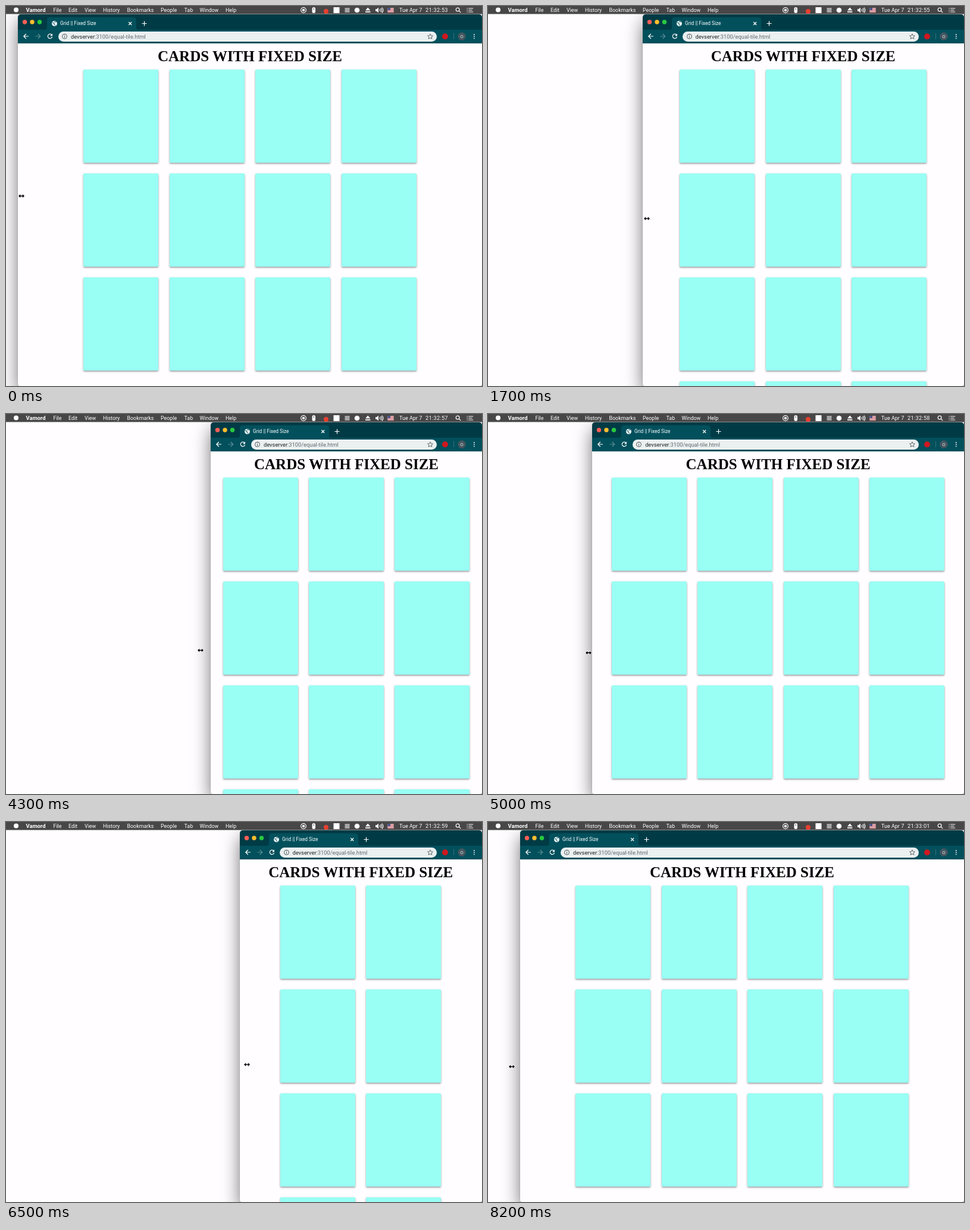
Animation of 800x640 px, one loop 8300 ms. Source, as an HTML page:

```html
<!DOCTYPE html>
<html lang="en">
<head>
<meta charset="utf-8">
<title>Fixed size cards</title>
<style>
  html, body { margin: 0; width: 100%; height: 100%; overflow: hidden; background: #fffdff; }
  body { font-family: Roboto, sans-serif; }
  #stage { position: absolute; left: 0; top: 0; width: 800px; height: 640px; overflow: hidden; }
  svg { position: absolute; top: 0; overflow: visible; }
  .line { fill: none; stroke: #fff; stroke-width: 1.2; }

  #window {
    position: absolute; top: 14px; right: 0; bottom: 0;
    border-radius: 5px 5px 3px 3px; background: #fffdff;
    box-shadow: 0 12px 30px rgba(0, 0, 0, .55), 0 0 1px rgba(0, 0, 0, .5);
  }
  #clip { position: absolute; inset: 0; overflow: hidden; border-radius: inherit; }
  #tabs { height: 26px; background: #003b45; }
  #tools { height: 23px; background: #02505c; }
  #address {
    position: absolute; left: 67.5px; right: 76px; top: 28.5px; height: 17.5px;
    border-radius: 9px; background: #ebf0f1;
  }
  #address span {
    position: absolute; left: 21.5px; right: 25px; overflow: hidden;
    white-space: nowrap; text-overflow: ellipsis;
    font-size: 9.3px; line-height: 17.5px; color: #62686c;
  }
  #address b { font-weight: 400; color: #202124; }
  h1 {
    margin: 9.4px 18px 9.6px; text-align: center; color: #000;
    font: bold 25px/25px "Liberation Serif", "Times New Roman", serif;
  }
  #cards {
    display: grid; grid-template-columns: repeat(auto-fill, 126px);
    grid-auto-rows: 156.7px; gap: 18.4px; justify-content: center;
    max-width: 560px; margin: 0 auto; padding: 0 18px;
  }
  #cards div {
    border-radius: 1.5px; background: #99fff4;
    box-shadow: 0 1.5px 3px rgba(0, 0, 0, .42);
  }
</style>
</head>
<body>
<div id="stage">
  <div id="window">
    <div id="clip">
      <div id="tabs"></div>
      <div id="tools"></div>
      <div id="address"><span><b>devserver</b>:3100/equal-tile.html</span></div>
      <h1>CARDS WITH FIXED SIZE</h1>
      <div id="cards"></div>

      <svg width="220" height="49" style="left:0">
        <circle cx="11.5" cy="13" r="3.7" fill="#ff5f57"/>
        <circle cx="24" cy="13" r="3.7" fill="#ffbd2e"/>
        <circle cx="36.5" cy="13" r="3.7" fill="#28c940"/>
        <path d="M45 26q4 0 4-4V10q0-5 5-5H194q5 0 5 5V22q0 4 4 4z" fill="#02505c"/>
        <circle cx="61.5" cy="15.5" r="4.5" fill="#e8f1f2"/>
        <path d="M58 14l3 1 0 2 2 2M61 12l2 1 2-1" fill="none" stroke="#02505c"/>
        <text x="71" y="18" font-size="8.3" fill="#fff">Grid || Fixed Size</text>
        <path class="line" d="M186.2 13l5 5m0-5l-5 5M208.5 15.5h8m-4-4v8"/>
        <path class="line" d="M18 37H10m3.8-4l-4 4 4 4"/>
        <path class="line" opacity=".35" d="M29.5 37h8m-3.8-4l4 4-4 4"/>
        <path class="line" d="M56.8 34.5a3.7 3.7 0 1 0 .7 3.5"/>
        <path d="M58 32.5v4h-4z" fill="#fff"/>
        <circle cx="78.5" cy="37.2" r="4" fill="none" stroke="#50565a"/>
        <path d="M78.5 36.5v3M78.5 34.6v1" stroke="#50565a"/>
      </svg>

      <svg width="100" height="49" style="right:0">
        <path d="M13 33l1.3 2.8 3.1.3-2.3 2.1.7 3-2.8-1.6-2.8 1.6.7-3-2.3-2.1 3.1-.3z" fill="none" stroke="#50565a" stroke-width=".9"/>
        <circle cx="38" cy="37.2" r="5" fill="#cf1820"/>
        <path d="M52.5 32v10" stroke="#33727b"/>
        <circle cx="66" cy="37.2" r="6.7" fill="#45565f"/>
        <text x="66" y="40.2" font-size="8" text-anchor="middle" fill="#e6eaec">O</text>
        <path d="M86.8 34v0m0 3.2v0m0 3.2v0" stroke="#fff" stroke-width="1.8" stroke-linecap="round"/>
      </svg>
    </div>
  </div>

  <svg id="menu" width="800" height="14" style="left:0" font-size="8.9" fill="#fff">
    <rect width="800" height="13.5" fill="#484748"/>
    <circle cx="17" cy="6.5" r="4"/>
    <text x="33.5" y="10" font-size="9.4" font-weight="700">Vamord</text>
    <circle class="line" cx="500" cy="7" r="4.3"/>
    <rect x="498" y="5" width="4" height="4" rx="1"/>
    <rect x="514.5" y="2" width="5.5" height="10" rx="2.7"/>
    <path d="M517.2 3.5v3" stroke="#484748"/>
    <circle cx="538" cy="9" r="4" fill="#e8402f"/>
    <rect x="550.5" y="2" width="10" height="10"/>
    <rect x="569.5" y="3" width="8" height="8" fill="#a5a5a5"/>
    <circle cx="590" cy="7" r="4.3"/>
    <path d="M604 7.5l4.2-5 4.2 5zM604 9h8.4v1.8H604z"/>
    <path d="M621 5.2h2l3-2.7v9l-3-2.7h-2z"/>
    <path class="line" d="M628 5q1.5 2 0 4M630 3.7q2.6 3.3 0 6.6M632 2.5q3.6 4.5 0 9"/>
    <rect x="641.5" y="3" width="10" height="8" fill="#eee"/>
    <path d="M641.5 4h10m-10 2h10m-10 2h10m-10 2h10" stroke="#cc4b55"/>
    <rect x="641.5" y="3" width="4.5" height="4" fill="#4b5390"/>
    <text x="661" y="10" font-size="9">Tue Apr 7</text>
    <text id="clock" x="705" y="10" font-size="9.2" letter-spacing=".3"></text>
    <path class="line" d="M762 6a2.9 2.9 0 1 1-5.8 0a2.9 2.9 0 1 1 5.8 0M761.3 8.2l3 3"/>
    <path class="line" d="M774.5 4h1.5m1.2 0h8M774.5 7h1.5m1.2 0h6.5M774.5 10h1.5m1.2 0h8"/>
  </svg>

  <svg id="cursor" width="1" height="1" style="left:0">
    <path stroke="#fff" stroke-width="1.2" paint-order="stroke"/>
  </svg>
</div>

<script>
  const LOOP = 8300, STEP = 100, MIN_WIDTH_X = 487.5;
  const CLOCK_START = 32 * 60 + 53.45;
  const BOTH_ARROWS = 'M-5 0l3.2-3v2.2h3.6V-3L5 0 1.8 3V.8h-3.6V3z';
  const LEFT_ARROW = 'M-4 0l3.2-3v2.2H4V.8H-.8V3z';

  // time, window left edge, cursor x, cursor y
  const path = [
    [0, 20, 26, 320], [400, 55, 70, 324], [900, 177, 190, 340],
    [1400, 215, 222, 350], [1700, 259.5, 267, 358], [1800, 277, 290, 360],
    [2600, 480, 500, 392], [2700, MIN_WIDTH_X, 530, 398], [3200, MIN_WIDTH_X, 526, 404],
    [3500, MIN_WIDTH_X, 480, 402], [4300, 344, 327, 398], [4500, 297, 284, 399],
    [5300, 102, 100, 404], [5500, 95, 104, 406], [5700, 127, 145, 407],
    [6300, 330, 345, 408], [6700, 455, 465, 409], [6900, 455, 450, 409],
    [7400, 304, 282, 410], [8100, 80, 62, 412], [8200, 54, 40, 412]
  ];

  const $ = id => document.getElementById(id);
  const pad = n => String(n).padStart(2, '0');

  const menus = { File: 79.5, Edit: 105, View: 132, History: 163, Bookmarks: 203.5,
                  People: 260, Tab: 299.5, Window: 325.5, Help: 369 };
  for (const [name, x] of Object.entries(menus)) {
    $('menu').insertAdjacentHTML('beforeend', `<text x="${x}" y="10">${name}</text>`);
  }
  $('cards').innerHTML = '<div></div>'.repeat(12);

  function pose(t) {
    const i = path.findIndex(p => p[0] >= t);
    if (i < 1) return path[0];
    const a = path[i - 1], b = path[i], k = (t - a[0]) / (b[0] - a[0]);
    return a.map((v, j) => v + (b[j] - v) * k);
  }

  function draw() {
    const t = Math.floor(performance.now() % LOOP / STEP) * STEP;
    const [, left, x, y] = pose(t);
    $('window').style.left = left + 'px';
    $('cursor').style.transform = `translate(${x}px, ${y}px)`;
    $('cursor').firstElementChild.setAttribute('d', left >= MIN_WIDTH_X ? LEFT_ARROW : BOTH_ARROWS);
    const s = Math.floor(CLOCK_START + t / 1000);
    $('clock').textContent = `21:${pad(Math.floor(s / 60))}:${pad(s % 60)}`;
    requestAnimationFrame(draw);
  }
  draw();
</script>
</body>
</html>
```
